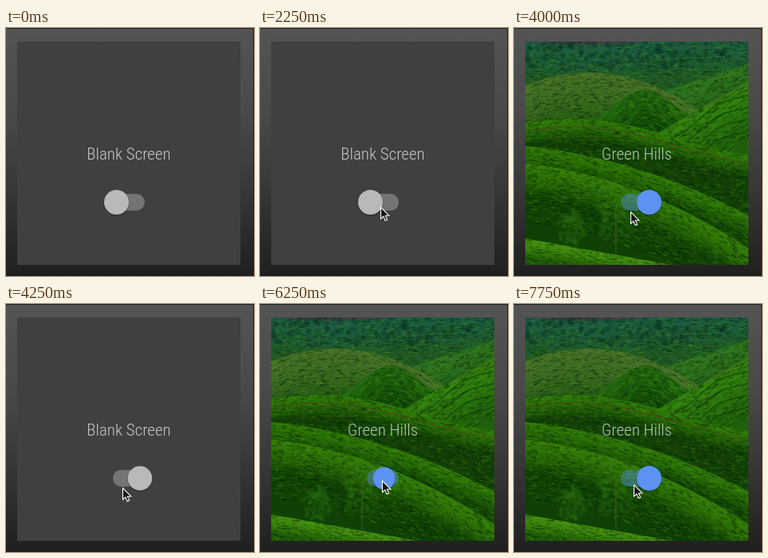
Recreate the animation shown at these times as an HTML page with a canvas. Size 311 by 311 pixels, loop 8 s.

```html
<!DOCTYPE html>
<html lang="en">
<head>
<meta charset="utf-8">
<title>Screen toggle</title>
<style>
  html, body { margin: 0; width: 100%; height: 100%; overflow: hidden; }
  #stage {
    position: relative; width: 311px; height: 311px; overflow: hidden;
    background: linear-gradient(#545454, #494949 35%, #373737 65%, #1f1f1f);
    box-shadow: inset -1px 1px #202020;
  }
  #stage > * { position: absolute; }
  #card, #hills { left: 14px; top: 17px; width: 280px; height: 280px; }
  #card { background: #404040; }
  #label {
    left: 14px; top: 144px; width: 280px; text-align: center; white-space: nowrap;
    font: 300 21px/28px "Roboto Condensed", Roboto, sans-serif;
    font-stretch: 75%; color: rgba(255, 255, 255, .7);
  }
  #track { left: 134px; top: 208px; width: 40px; height: 21px; border-radius: 11px; background: #747474; }
  .on #track { background: rgba(92, 147, 242, .4); }
  #knob {
    left: 0; top: 203px; width: 31px; height: 31px; border-radius: 50%;
    background: #b9b9b9; box-shadow: 0 1px 2px rgba(0, 0, 0, .4);
  }
  .on #knob { background: #5c93f2; }
  #hills { visibility: hidden; }
  .on #hills { visibility: visible; }
  #cursor { left: 0; top: 0; overflow: visible; }
</style>
</head>
<body>
<div id="stage">
  <div id="card"></div>
  <canvas id="hills" width="280" height="280"></canvas>
  <div id="label"></div>
  <div id="track"></div>
  <div id="knob"></div>
  <svg id="cursor" width="12" height="19">
    <path d="M.5 .8V15.2L3.8 12.1L6.1 17.5L8.6 16.4L6.3 11.2H10.8Z" fill="#111" stroke="#fff" stroke-width="1.1"/>
  </svg>
</div>
<script>
const $ = id => document.getElementById(id);
const ctx = $('hills').getContext('2d');
const SIZE = 280;

let seed = 7;
const rand = () => (seed = seed * 16807 % 2147483647) / 2147483647;

function curve(ridge, shift = 0, from = 0) {
  const path = new Path2D();
  for (let x = from; x <= SIZE; x += 4) path.lineTo(x, ridge(x) + shift);
  return path;
}

function trail(ridge, shift, color, from) {
  ctx.strokeStyle = color;
  ctx.lineWidth = 1.2;
  ctx.stroke(curve(ridge, shift, from));
}

// A slope lit along its ridge, covered with small strokes that follow it.
function hill(ridge, lit, shade, depth) {
  const body = curve(ridge);
  body.lineTo(SIZE, SIZE);
  body.lineTo(0, SIZE);
  ctx.fillStyle = shade;
  ctx.fill(body);
  ctx.save();
  ctx.clip(body);
  ctx.lineWidth = 3;
  ctx.strokeStyle = lit;
  for (let d = 0; d < depth; d += 2) {
    ctx.globalAlpha = 1 - d / depth;
    ctx.stroke(curve(ridge, d));
  }
  ctx.globalAlpha = 1;
  ctx.lineWidth = 1.3;
  for (let i = 0; i < 1800; i++) {
    const x = rand() * SIZE, d = rand() * 75, w = 2 + rand() * 5;
    ctx.strokeStyle = rand() < .6 ? 'rgba(0,30,0,.3)' : 'rgba(85,165,15,.22)';
    ctx.beginPath();
    ctx.moveTo(x, ridge(x) + d);
    ctx.lineTo(x + w, ridge(x + w) + d);
    ctx.stroke();
  }
  ctx.restore();
}

function leaves(count, x, y, w, h, color, size) {
  ctx.fillStyle = color;
  for (let i = 0; i < count; i++) {
    const a = rand() * Math.PI * 2, r = Math.sqrt(rand());
    ctx.beginPath();
    ctx.arc(x + Math.cos(a) * r * w, y + Math.sin(a) * r * h, size, 0, 7);
    ctx.fill();
  }
}

const wood = x => 4 * Math.sin(x / 50);
const far = x => 28 + .33 * (SIZE - x);
const olive = x => 39 + .0025 * (x - 80) ** 2;
const cone = x => 105 - 44 * Math.exp(-(((x - 150) / 50) ** 2));
const right = x => 50 + .57 * (SIZE - x);
const crest = x => 121 - 24 * Math.cos(Math.PI * (x - 60) / 260);
const middle = x => 131 + .1 * x + .00075 * x * x;
const slope = x => 153 + .1 * x + .001 * x * x;
const front = x => 247 + .18 * x;
const terrace = x => right(x) + 5 * Math.sin(x / 14);

function paintHills() {
  hill(wood, '#1c5c42', '#1f5a26', 45);
  leaves(150, 110, 16, 150, 20, 'rgba(6,48,34,.3)', 3);
  hill(far, '#2f7420', '#23611a', 35);
  hill(olive, '#47702a', '#255a14', 60);
  hill(cone, '#22670f', '#124c08', 40);
  hill(right, '#32800f', '#1f610b', 55);
  for (let d = 12; d < 60; d += 15) trail(terrace, d, 'rgba(10,50,5,.7)', 175 + d);
  trail(terrace, 4, 'rgba(110,95,50,.5)', 225);
  hill(crest, '#2f7a08', '#124006', 28);
  trail(crest, 10, 'rgba(95,60,25,.65)');
  hill(middle, '#2f7a06', '#124505', 30);
  hill(slope, '#347d08', '#0f4104', 42);
  hill(front, '#43900f', '#1c5a07', 24);
  leaves(70, 112, 200, 24, 24, 'rgba(55,125,22,.22)', 3);
  leaves(70, 58, 233, 18, 22, 'rgba(45,110,20,.25)', 3);
  leaves(70, 114, 232, 24, 18, 'rgba(40,105,18,.22)', 3);
  ctx.fillStyle = 'rgba(70,95,35,.6)';
  ctx.fillRect(113, 205, 1.5, 75);
}

// time, x, y: the pointer rests at each point until the next one
const pointer = [
  [0, -40, 0], [500, 262, 173], [750, 201, 174], [1250, 211, 194],
  [2000, 175, 243], [2250, 151, 224], [2500, 151, 227], [2750, 153, 231],
  [3000, 147, 232], [4000, 146, 230], [4750, 151, 233], [5000, 152, 230],
  [5250, 153, 221], [6750, 156, 225], [7250, 157, 227], [7750, 150, 226]
];
const clicks = [2390, 4235, 6085];
const LOOP = 8000, STEP = 250, SLIDE = 300;

function draw(now) {
  const t = Math.floor(now % LOOP / STEP) * STEP;
  const done = clicks.filter(c => c <= t);
  const on = done.length % 2;
  const moved = done.length ? Math.min(1, (t - done.at(-1)) / SLIDE) : 1;
  const place = on ? moved : 1 - moved;
  const scale = 1 - .1 * Math.sin(Math.PI * moved);
  const [, x, y] = pointer.findLast(p => p[0] <= t);
  $('stage').className = on ? 'on' : '';
  $('label').textContent = on ? 'Green Hills' : 'Blank Screen';
  $('knob').style.transform = `translateX(${123 + 31 * place}px) scale(${scale})`;
  $('cursor').style.transform = `translate(${x}px, ${y}px)`;
}

paintHills();
const start = performance.now();
function tick() {
  draw(performance.now() - start);
  requestAnimationFrame(tick);
}
tick();
</script>
</body>
</html>
```
